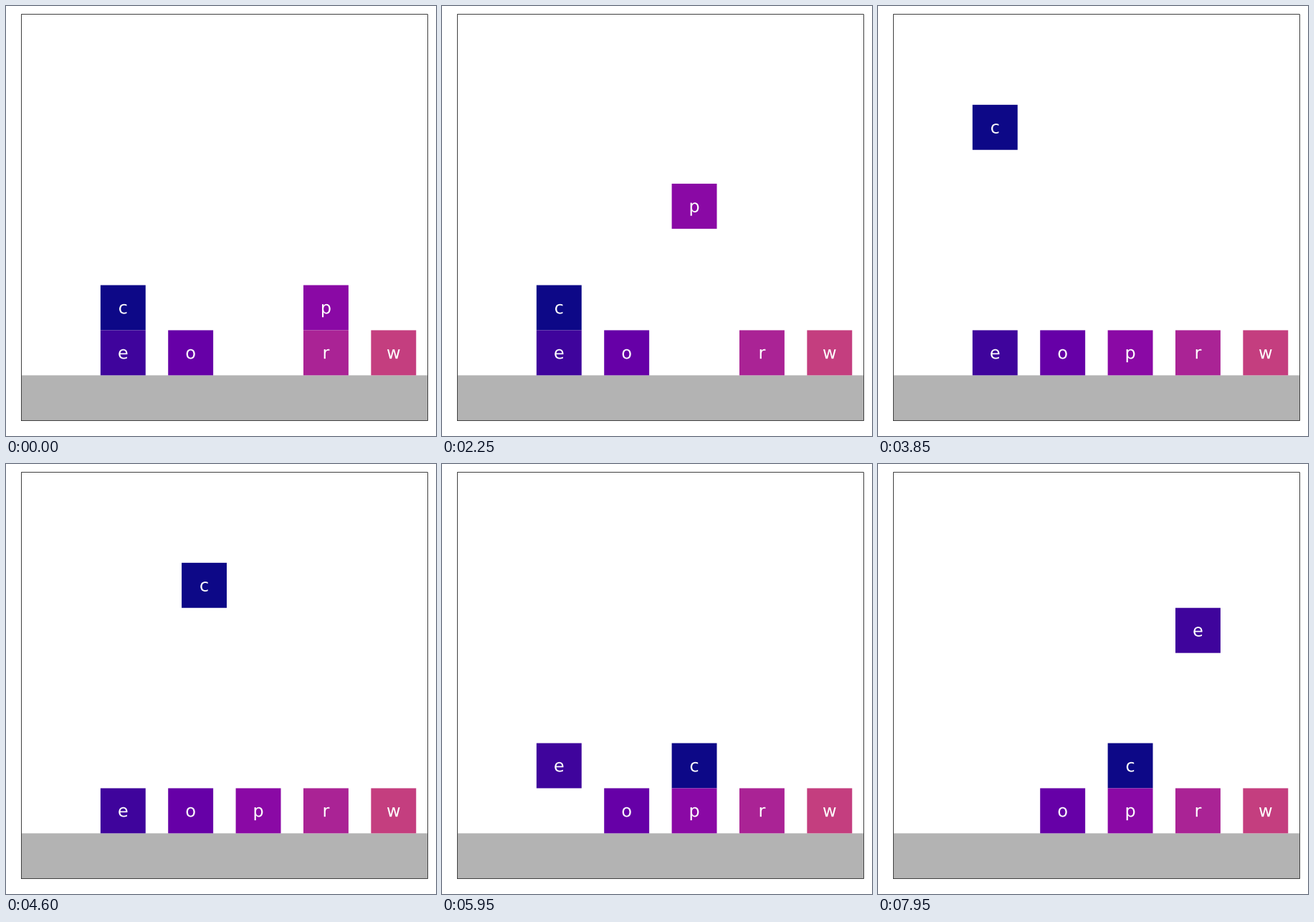
A matplotlib script for the animation above (8 s loop, 600x600 px).

```python
import matplotlib.pyplot as plt
from matplotlib.animation import FuncAnimation
from matplotlib.patches import PathPatch, Rectangle
from matplotlib.textpath import TextPath
from matplotlib.transforms import Affine2D

SIZE, DPI = 600, 80
FRAMES, INTERVAL = 160, 50
LEFT, TOP, SIDE, LINE = 21.75, 12, 566.25, 0.75  # stage frame, in pixels

ACTION = 29           # frames per pick or place action
LIFT, SHIFT = 20, 10  # ticks for vertical and horizontal travel
CARRY = 6             # height at which blocks are carried

# Advance width of each letter, in ems
LETTERS = {"c": 0.55, "e": 0.615, "o": 0.612,
           "p": 0.635, "r": 0.411, "w": 0.818}
EM = 24 * 9 / SIDE    # font size in block units
MID_LINE = 0.346      # middle of ascent and descent, in ems

START = {"c": (0, 2), "e": (0, 1), "o": (1, 1),
         "p": (3, 2), "r": (3, 1), "w": (4, 1)}
MOVES = [("p", (2, 1)), ("c", (2, 2)), ("e", (3, 2))]


def column_x(col):
    return 1.75 + 1.5 * col


def lerp(a, b, t):
    return a + (b - a) * min(max(t, 0), 1)


def carried(src, dst, step):
    """Position of a block `step` frames into its pick and place."""
    (c0, y0), (c1, y1) = src, dst
    x0, x1 = column_x(c0), column_x(c1)
    if step <= 0:
        return x0, y0
    if step <= ACTION:
        return x0, lerp(y0, CARRY, (step + 1) / LIFT)
    tick = step - ACTION + 1
    x = lerp(x0, x1, tick / SHIFT)
    y = lerp(CARRY, y1, (tick - SHIFT) / LIFT)
    return x, y


def layout(frame):
    places = {k: (column_x(col), y) for k, (col, y) in START.items()}
    for i, (name, dst) in enumerate(MOVES):
        places[name] = carried(START[name], dst, frame - 2 * ACTION * i)
    return places


def make_block(letter, color):
    box = Rectangle((0, 0), 1, 1, fc=color, lw=0, snap=False)
    origin = 0.5 - EM * LETTERS[letter] / 2, 0.5 - EM * MID_LINE
    glyph = TextPath(origin, letter, size=EM, prop="DejaVu Sans")
    label = PathPatch(glyph, fc="white", lw=0, snap=False)
    for patch in (box, label):
        ax.add_patch(patch)
    return box, label


fig = plt.figure(figsize=(SIZE / DPI, SIZE / DPI), dpi=DPI, facecolor="white")
ax = fig.add_axes([LEFT / SIZE, 1 - (TOP + SIDE) / SIZE,
                   SIDE / SIZE, SIDE / SIZE])
ax.set(xlim=(0, 9), ylim=(0, 9))
ax.axis("off")
ax.add_patch(Rectangle((0, 0), 9, 1, fc="0.7", lw=0, snap=False))

# The border sits just outside the axes
edge = LINE / 2 / SIDE
ax.add_patch(Rectangle((-edge, -edge), 1 + 2 * edge, 1 + 2 * edge,
                       transform=ax.transAxes, fill=False, ec="black",
                       lw=LINE * 72 / DPI, snap=False, clip_on=False))

blocks = {name: make_block(name, plt.cm.plasma(24 * i))
          for i, name in enumerate(LETTERS)}


def update(frame):
    for name, (x, y) in layout(frame).items():
        place = Affine2D().translate(x, y) + ax.transData
        for patch in blocks[name]:
            patch.set_transform(place)
    return [patch for pair in blocks.values() for patch in pair]


anim = FuncAnimation(fig, update, frames=FRAMES, interval=INTERVAL,
                     init_func=lambda: update(0), repeat=True)
plt.show()
```
